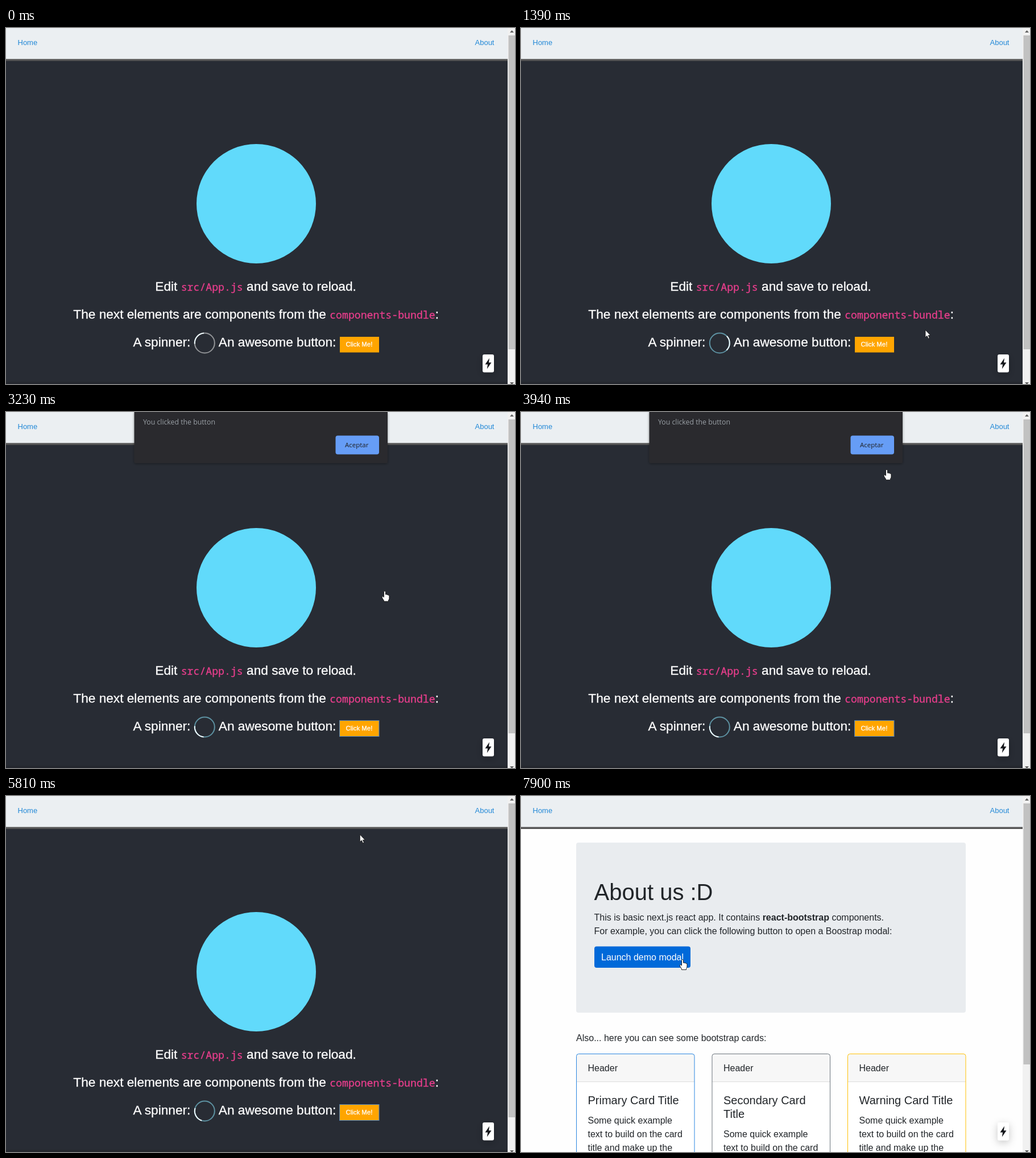
These frames come from a looping animation (895x626 px, 8 s). An HTML page:

```html
<!DOCTYPE html>
<html lang="en">
<head>
<meta charset="utf-8">
<title>Component demo</title>
<style>
  html, body { margin: 0; width: 100%; height: 100%; overflow: hidden; background: #fff; }
  svg { display: block; width: 895px; height: 626px; font: 16px "Liberation Sans", Arial, sans-serif; }
  text { white-space: pre; fill: #212529; }
  #home text { fill: #fff; stroke: #fff; stroke-width: .3px; font-size: 22.67px; }
  #home .code { fill: #e83e8c; stroke: #e83e8c; font: 18.2px "Noto Sans Mono", monospace; }
  #home .label { font-size: 11.4px; }
  .link { fill: #2389d7; font-size: 13px; }
  .title { font-size: 20px; }
  .native { font: 12.3px "Open Sans", "Noto Sans", sans-serif; fill: #9aa0a6; }
</style>
</head>
<body>
<svg viewBox="0 0 895 626">
  <defs>
    <filter id="shadow" x="-20%" y="-20%" width="140%" height="140%">
      <feDropShadow dx="0" dy="1" stdDeviation="2" flood-opacity=".4"/>
    </filter>
    <filter id="glow" x="-150%" y="-100%" width="400%" height="300%">
      <feDropShadow dx="0" dy="4" stdDeviation="7" flood-opacity=".22"/>
    </filter>
  </defs>

  <g id="home">
    <rect width="882" height="626" fill="#282c34"/>
    <rect y="622" width="882" height="4" fill="#24272e"/>
    <circle cx="440" cy="309" r="105" fill="#61dafb"/>
    <text x="262.3" y="461.5">Edit <tspan class="code">src/App.js</tspan> and save to reload.</text>
    <text x="118.3" y="511">The next elements are components from the <tspan class="code">components-bundle</tspan>:</text>
    <text x="223.6" y="560">A spinner:</text>
    <text x="373.8" y="560">An awesome button:</text>
    <g fill="none" stroke-width="2">
      <circle id="ring" cx="349.3" cy="554" r="17.5"/>
      <circle id="arc" cx="349.3" cy="554" r="17.5" stroke="#f0fcff" pathLength="360" stroke-dasharray="90 270"/>
    </g>
    <rect x="587" y="543" width="69" height="27.5" fill="#ffa500"/>
    <rect id="focus" x="586.5" y="542.5" width="69.5" height="28" fill="none" stroke="#4b80c0"/>
    <text x="597.5" y="560" class="label">Click Me!</text>
  </g>

  <g id="about">
    <rect width="882" height="626" fill="#fefefe"/>
    <rect x="97" y="82" width="685" height="299" rx="4" fill="#e9ecef"/>
    <text x="128.5" y="183" font-size="40">About us :D</text>
    <text x="128.5" y="218.5">This is basic next.js react app. It contains <tspan font-weight="bold">react-bootstrap</tspan> components.</text>
    <text x="128.5" y="242.5">For example, you can click the following button to open a Boostrap modal:</text>
    <rect id="launch" x="129" y="264.5" width="169" height="37.5" rx="4"/>
    <text x="141" y="289" style="fill:#fff">Launch demo modal</text>
    <text x="97" y="430.5">Also... here you can see some bootstrap cards:</text>
    <g id="cards"></g>
  </g>

  <rect width="882" height="55" fill="#ebeff2"/>
  <rect y="54.5" width="882" height="3.5" fill="#555"/>
  <text x="20.5" y="30" class="link">Home</text>
  <text x="824.5" y="30" class="link">About</text>

  <rect x="882" width="13" height="626" fill="#f1f1f1"/>
  <rect id="thumb" x="883.5" y="13" width="11.5" fill="#c1c1c1"/>
  <path d="M886 8l3.5-4 3.5 4zM886 623h7l-3.5 4z" fill="#606060"/>

  <rect x="838" y="574" width="20" height="31.5" rx="3" fill="#fff" filter="url(#glow)"/>
  <path d="M850 580.5L842.5 591.5H847L845.8 599.5L853.5 588.3H849Z" fill="#15171c"/>

  <g id="status">
    <path d="M0 613H116Q119.500 613 119.500 617V626H0Z" fill="#35363a"/>
    <text x="1" y="627" class="native" style="font-size:11.5px">localhost:3000/about</text>
  </g>

  <g id="dialog">
    <path d="M225.500 0H671V87Q671 90 668 90H228.500Q225.500 90 225.500 87Z" fill="#292a2d" filter="url(#shadow)"/>
    <text x="241" y="21.500" class="native">You clicked the button</text>
    <rect x="579.5" y="41.5" width="76.500" height="33" rx="4" fill="#669df6"/>
    <text x="596" y="62" class="native" style="fill:#202124;font-size:11.5px;font-weight:500">Aceptar</text>
  </g>

  <g id="cursor">
    <circle id="press" r="12" fill="#f7ef3a" fill-opacity=".75"/>
    <path id="arrow" d="M0 0V13L3 10.300L5.200 15.200L7.200 14.300L5.100 9.500H9Z" fill="#fff" stroke="#111" stroke-width=".8"/>
    <path id="hand" d="M-1.500 1.500Q0-1 1.500 1.500V6.500Q3 5 4 7Q5.500 5.500 6.300 7.700Q8 6.500 8 9V13Q8 15 6.500 16.500V18.500H-1.500V17Q-5 12-5 10.500Q-4 8.500-1.500 11Z" fill="#fff" stroke="#111" stroke-width=".9"/>
  </g>
</svg>

<script>
const LOOP = 8000;
const $ = id => document.getElementById(id);
const show = (id, visible) => $(id).style.display = visible ? '' : 'none';
const within = (t, from, to) => t >= from && t < to;

const DIALOG = [2780, 5400];
const ABOUT_AT = 6730;
const HANDS = [[2150, 5400], [5960, 7040], [7700, LOOP]];
const PRESSES = [[2620, 2780], [5200, 5400], [6580, 6730]];

// time, x, y of the pointer tip
const PATH = [
  [70, 718, 580], [920, 711, 562], [1300, 711, 531], [1400, 711, 531],
  [1700, 670, 545], [2540, 640, 552], [2780, 640, 552], [3230, 666, 315],
  [3400, 653, 240], [4100, 640, 60], [4330, 640, 56], [4650, 625, 108],
  [5120, 621, 68], [5810, 621, 68], [5960, 820, 36], [6200, 830, 21],
  [6960, 830, 21], [7500, 327, 259], [7670, 327, 259], [7880, 284, 287]
];

function pointerAt(t) {
  const next = PATH.findIndex(key => key[0] > t);
  if (next < 1) return next ? PATH.at(-1).slice(1) : PATH[0].slice(1);
  const [t0, x0, y0] = PATH[next - 1], [t1, x1, y1] = PATH[next];
  const k = (t - t0) / (t1 - t0);
  return [x0 + (x1 - x0) * k, y0 + (y1 - y0) * k];
}

function card(x, color, titles) {
  const body = ['Some quick example', 'text to build on the card', 'title and make up the'];
  const top = 576 + (titles.length - 1) * 24;
  const lines = (list, y, cls) => list.map((line, i) =>
    `<text class="${cls}" x="20.5" y="${y + i * 24}">${line}</text>`).join('');
  return `<g transform="translate(${x})">
    <rect x=".5" y="453.5" width="207.5" height="200" rx="4" fill="#fff"/>
    <path d="M.5 502.5V457.5Q.5 453.5 4.5 453.5H204Q208 453.5 208 457.5V502.5Z" fill="#f7f7f7"/>
    <path d="M0 502.5H208" stroke="#dcdcdc"/>
    <rect x=".5" y="453.5" width="207.5" height="200" rx="4" fill="none" stroke="${color}"/>
    <text x="20.5" y="484">Header</text>
    ${lines(titles, 542, 'title')}${lines(body, top, '')}</g>`;
}

$('cards').innerHTML =
  card(97, '#2a86e0', ['Primary Card Title']) +
  card(335.5, '#6c757d', ['Secondary Card', 'Title']) +
  card(574, '#ffc107', ['Warning Card Title']);

function draw(t) {
  const about = t >= ABOUT_AT;
  const dialog = within(t, ...DIALOG);
  show('home', !about);
  show('about', about);
  show('dialog', dialog);
  show('focus', t >= 2620);
  show('status', within(t, 5980, 7100));
  $('thumb').setAttribute('height', about ? 459 : 552);
  $('launch').setAttribute('fill', t >= 7700 ? '#0069d9' : '#007bff');

  // The open dialog blocks the spinner but not its clock.
  const spin = 310 + 0.36 * (dialog ? DIALOG[0] : t);
  $('arc').setAttribute('transform', `rotate(${spin - 135} 349.3 554)`);
  $('ring').setAttribute('stroke', t < 70 ? '#939598' : t < 6000 ? '#5d92a2' : '#87979b');

  const hand = HANDS.some(span => within(t, ...span));
  show('cursor', t >= 70);
  show('hand', hand);
  show('arrow', !hand);
  show('press', PRESSES.some(span => within(t, ...span)));
  $('cursor').setAttribute('transform', `translate(${pointerAt(t)})`);
}

const start = performance.now();
function tick() {
  draw((performance.now() - start) % LOOP);
  requestAnimationFrame(tick);
}
tick();
</script>
</body>
</html>
```
